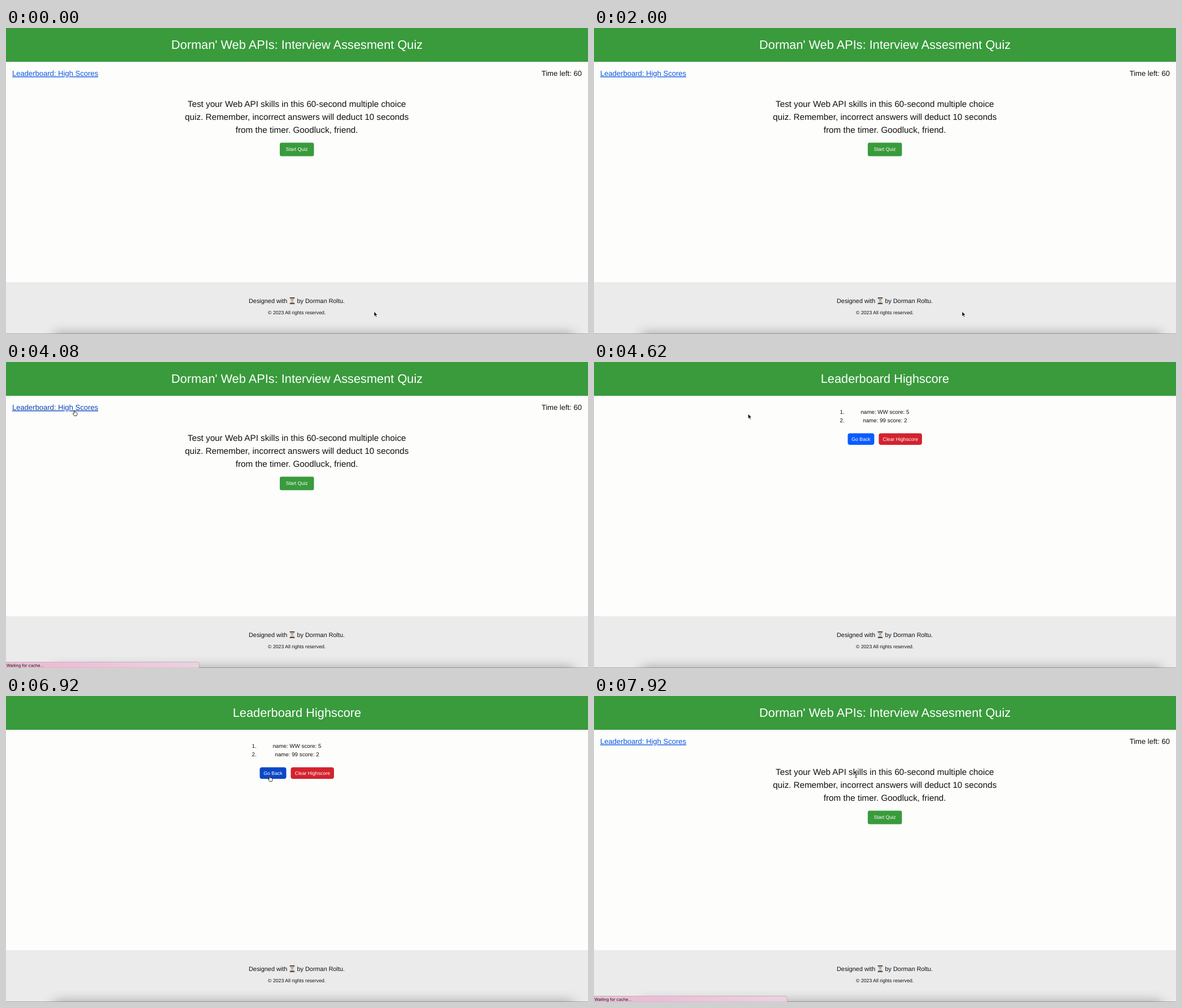
These frames come from a looping animation (1031x543 px, 8000 ms). An HTML page:

```html
<!DOCTYPE html>
<html lang="en">
<head>
<meta charset="utf-8">
<title>Interview Quiz</title>
<style>
  html { font-size: 10.89px; }
  html, body { margin: 0; width: 100%; height: 100%; overflow: hidden; background: #fdfdfc; }
  svg { display: block; }
  text { font-family: "Liberation Sans", Arial, sans-serif; fill: #111; text-rendering: geometricPrecision; }
  .mid { text-anchor: middle; }
  .end { text-anchor: end; }
  .h1 { font-size: 2rem; fill: #fff; }
  .nav { font-size: 1.2rem; }
  .intro { font-size: 1.4rem; }
  .list { font-size: .9rem; }
  .foot { font-size: 1rem; }
  .small { font-size: .8rem; }
  .btn { font-size: .8rem; fill: #fff; text-anchor: middle; }
  .green { fill: #399b3c; }
  .link { fill: #0b57e3; text-decoration: underline; }
  .status { font: 7.2px Inter, sans-serif; }

  .home, .board, .link, .back, .bubble, .cursor, .arrow, .hand, .beam {
    animation: 8s step-end infinite;
  }
  .home { animation-name: home; }
  .board { animation-name: board; }
  .link { animation-name: link; }
  .back { animation-name: back; }
  .bubble { animation-name: bubble; }
  .cursor { animation-name: move; }
  .arrow { animation-name: arrow; }
  .hand { animation-name: hand; }
  .beam { animation-name: beam; }

  @keyframes home { 0%, 94.2% { opacity: 1; } 52.85% { opacity: 0; } 100% { opacity: 1; } }
  @keyframes board { 0%, 94.2%, 100% { opacity: 0; } 52.85% { opacity: 1; } }
  @keyframes link { 0%, 52.85%, 100% { fill: #0b57e3; } 44.2% { fill: #0b43b4; } }
  @keyframes back { 0%, 94.2%, 100% { fill: #0b5cff; } 85.6% { fill: #0b47c6; } }
  @keyframes bubble { 0%, 54.85% { opacity: 0; } 49.1%, 90.3%, 100% { opacity: 1; } }
  @keyframes arrow { 0%, 52.85%, 91.3% { opacity: 1; } 44.2%, 85.6%, 94.2%, 100% { opacity: 0; } }
  @keyframes hand { 0%, 52.85%, 91.3%, 100% { opacity: 0; } 44.2%, 85.6% { opacity: 1; } }
  @keyframes beam { 0% { opacity: 0; } 94.2%, 100% { opacity: 1; } }
  @keyframes move {
    0% { transform: translate(652px, 503px); }
    41.35% { transform: translate(560px, 430px); }
    42.35% { transform: translate(330px, 255px); }
    43.2% { transform: translate(160px, 115px); }
    44.2% { transform: translate(121px, 86px); }
    53.85% { transform: translate(150px, 88px); }
    54.85% { transform: translate(205px, 91px); }
    55.7% { transform: translate(250px, 92px); }
    56.7% { transform: translate(273px, 92px); }
    81.7% { transform: translate(290px, 97px); }
    82.7% { transform: translate(325px, 108px); }
    83.6% { transform: translate(370px, 121px); }
    84.6% { transform: translate(415px, 133px); }
    85.6% { transform: translate(450px, 140px); }
    86.45% { transform: translate(467px, 142px); }
    96.2%, 100% { transform: translate(464px, 140px); }
  }
</style>
</head>
<body>
<svg width="1031" height="543" viewBox="0 0 1031 543">
  <defs>
    <linearGradient id="pink">
      <stop offset="0" stop-color="#e8bfd2"/>
      <stop offset=".3" stop-color="#edbdd6"/>
      <stop offset="1" stop-color="#ead3df"/>
    </linearGradient>
    <filter id="soft" x="-10%" y="-200%" width="120%" height="500%">
      <feGaussianBlur stdDeviation="10"/>
    </filter>
  </defs>

  <rect width="1031" height="543" fill="#fdfdfc"/>
  <rect class="green" width="1031" height="60"/>

  <g class="home">
    <text class="h1 mid" x="515.5" y="37">Dorman' Web APIs: Interview Assesment Quiz</text>
    <text class="nav link" x="11" y="85">Leaderboard: High Scores</text>
    <text class="nav end" x="1020" y="85">Time left: 60</text>
    <g class="intro mid">
      <text x="515.2" y="140.3">Test your Web API skills in this 60-second multiple choice</text>
      <text x="515.2" y="163.2">quiz. Remember, incorrect answers will deduct 10 seconds</text>
      <text x="515.2" y="186">from the timer. Goodluck, friend.</text>
    </g>
    <rect class="green" x="485" y="203.5" width="60.5" height="24" rx="3"/>
    <text class="btn" x="515.2" y="218.4">Start Quiz</text>
  </g>

  <g class="board" opacity="0">
    <text class="h1 mid" x="515.5" y="37">Leaderboard Highscore</text>
    <g class="list">
      <text x="435.5" y="92.4">1.</text>
      <text class="mid" x="515.4" y="92.4">name: WW score: 5</text>
      <text x="435.5" y="107">2.</text>
      <text class="mid" x="515.4" y="107">name: 99 score: 2</text>
    </g>
    <rect class="back" x="449.5" y="126.5" width="47" height="20.5" rx="4" fill="#0b5cff"/>
    <text class="btn" x="473" y="140">Go Back</text>
    <rect x="504.5" y="126.5" width="76.5" height="20.5" rx="4" fill="#d3222e"/>
    <text class="btn" x="542.8" y="140">Clear Highscore</text>
  </g>

  <rect y="451" width="1031" height="92" fill="#ebebec"/>
  <rect x="85" y="542" width="920" height="40" fill="#444" opacity=".45" filter="url(#soft)"/>
  <rect y="542" width="1031" height="1" fill="#777" opacity=".6"/>
  <text class="foot" x="430" y="488">Designed with</text>
  <g>
    <path d="M503.8 479.5C503.8 483 506.4 482.8 506.4 484S503.8 485 503.8 488.5H510.2C510.2 485 507.6 485.200 507.6 484S510.200 483 510.200 479.500Z" fill="#d4d9da" stroke="#777b7c" stroke-width=".6"/>
    <path d="M505 481.300H509L507 483.700ZM504.500 488.300Q507 484.500 509.500 488.300Z" fill="#a98547"/>
    <path d="M502.700 478H511.300V479.700H502.700ZM502.700 488.200H511.300V490H502.700Z" fill="#5b3a2c"/>
  </g>
  <text class="foot" x="515.500" y="488">by Dorman Roltu.</text>
  <text class="small mid" x="515.200" y="507.600">© 2023 All rights reserved.</text>

  <g class="bubble" opacity="0">
    <path d="M0 532.500H339Q342 532.500 342 535.500V543H0Z" fill="url(#pink)" stroke="#b5a5ae" stroke-width=".7"/>
    <text class="status" x="1" y="541.300">Waiting for cache...</text>
  </g>

  <g class="cursor">
    <path class="arrow" d="M0 0V8.800L2 7L3.500 10.300L5 9.600L3.500 6.500H6.300Z" fill="#000" stroke="#fff" stroke-width=".8"/>
    <path class="hand" opacity="0" d="M-.700 .500Q0 -.700 .800 .500V3.200Q1.900 2.600 2.300 3.500Q3.300 3 3.700 4Q5 3.600 5.100 5V7Q4.600 8.300 4.300 9.500H-.300Q-1.200 7.600 -2.700 5.800Q-2.600 4.300 -.700 5.700Z" fill="#fff" stroke="#111" stroke-width=".8" stroke-linejoin="round"/>
    <path class="beam" opacity="0" d="M-2 -4.800Q0 -4.800 0 -3.500Q0 -4.800 2 -4.800M0 -3.500V3.500M-2 4.800Q0 4.800 0 3.500Q0 4.800 2 4.800M-1.200 1H1.200" fill="none" stroke="#222" stroke-width=".9"/>
  </g>
</svg>
</body>
</html>
```
